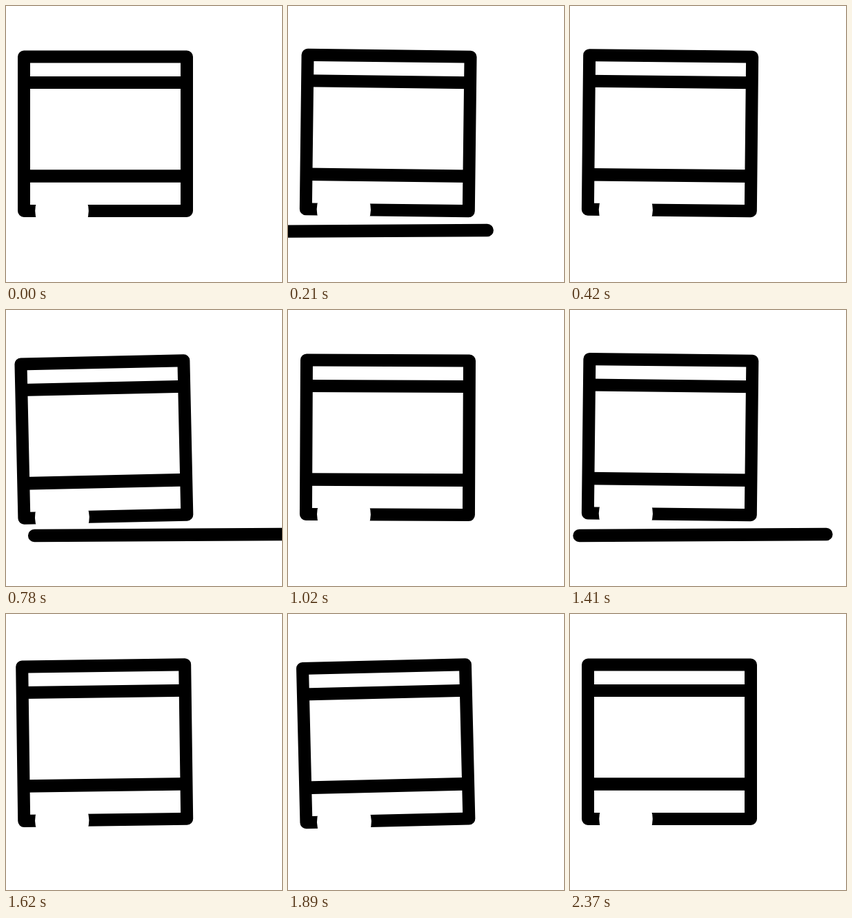
Recreate the animation shown at these times as an HTML page with a canvas. Size 400 by 400 pixels, loop 2.43 s.

```html
<!DOCTYPE html>
<html lang="en">
<head>
<meta charset="utf-8">
<style>
  html, body { margin: 0; width: 100%; height: 100%; overflow: hidden; background: #fff; }
  canvas { display: block; width: 100vw; height: 100vh; }
</style>
</head>
<body>
<canvas id="stage" width="400" height="400"></canvas>
<script>
const ctx = document.getElementById('stage').getContext('2d');

const LOOP = 2430;
const STEP = 30;
const LAST_STEP = 2370;
const PIVOT = { x: 246, y: 282 };

// Body tilt: [time in ms, degrees], eased between neighbours.
const TILT = [
  [0, 0], [330, 1], [680, -1.5], [1200, 0.95],
  [1300, 0.95], [1800, -1.5], [2340, 0], [LOOP, 0]
];

const ROAD = { passes: 3, last: 1410, period: 618, speed: 2.3, length: 358 };

const ease = p => p * p * (3 - 2 * p);

function tiltAt(t) {
  const i = TILT.findIndex(key => key[0] > t);
  const [t0, a0] = TILT[i - 1];
  const [t1, a1] = TILT[i];
  return a0 + (a1 - a0) * ease((t - t0) / (t1 - t0));
}

function line(x0, y0, x1, y1, width) {
  ctx.lineWidth = width;
  ctx.beginPath();
  ctx.moveTo(x0, y0);
  ctx.lineTo(x1, y1);
  ctx.stroke();
}

function drawBody(degrees) {
  ctx.save();
  ctx.translate(PIVOT.x, PIVOT.y);
  ctx.rotate(degrees * Math.PI / 180);
  ctx.translate(-PIVOT.x, -PIVOT.y);
  ctx.lineJoin = 'round';
  ctx.lineCap = 'butt';
  ctx.lineWidth = 18;
  ctx.strokeRect(26, 73.5, 236, 223.5);
  line(26, 111, 262, 111, 18);
  line(26, 246.5, 262, 246.5, 18.6);
  // Wheel arch
  ctx.fillStyle = '#fff';
  ctx.beginPath();
  ctx.arc(81, 297, 38.8 + 0.5 * Math.abs(degrees), 0, Math.PI * 2);
  ctx.fill();
  ctx.restore();
}

function drawRoad(t) {
  ctx.lineCap = 'round';
  for (let i = 0; i < ROAD.passes; i++) {
    const x = 13.5 - ROAD.speed * (t - ROAD.last + i * ROAD.period);
    line(x, 327, x + ROAD.length, 325, 18.4);
  }
}

function draw(now) {
  const t = Math.min(Math.floor((now % LOOP) / STEP) * STEP, LAST_STEP);
  ctx.fillStyle = '#fff';
  ctx.fillRect(0, 0, 400, 400);
  ctx.strokeStyle = '#000';
  drawBody(tiltAt(t));
  drawRoad(t);
}

let start;
function tick(now) {
  if (start === undefined) start = now;
  draw(now - start);
  requestAnimationFrame(tick);
}
draw(0);
requestAnimationFrame(tick);
</script>
</body>
</html>
```
